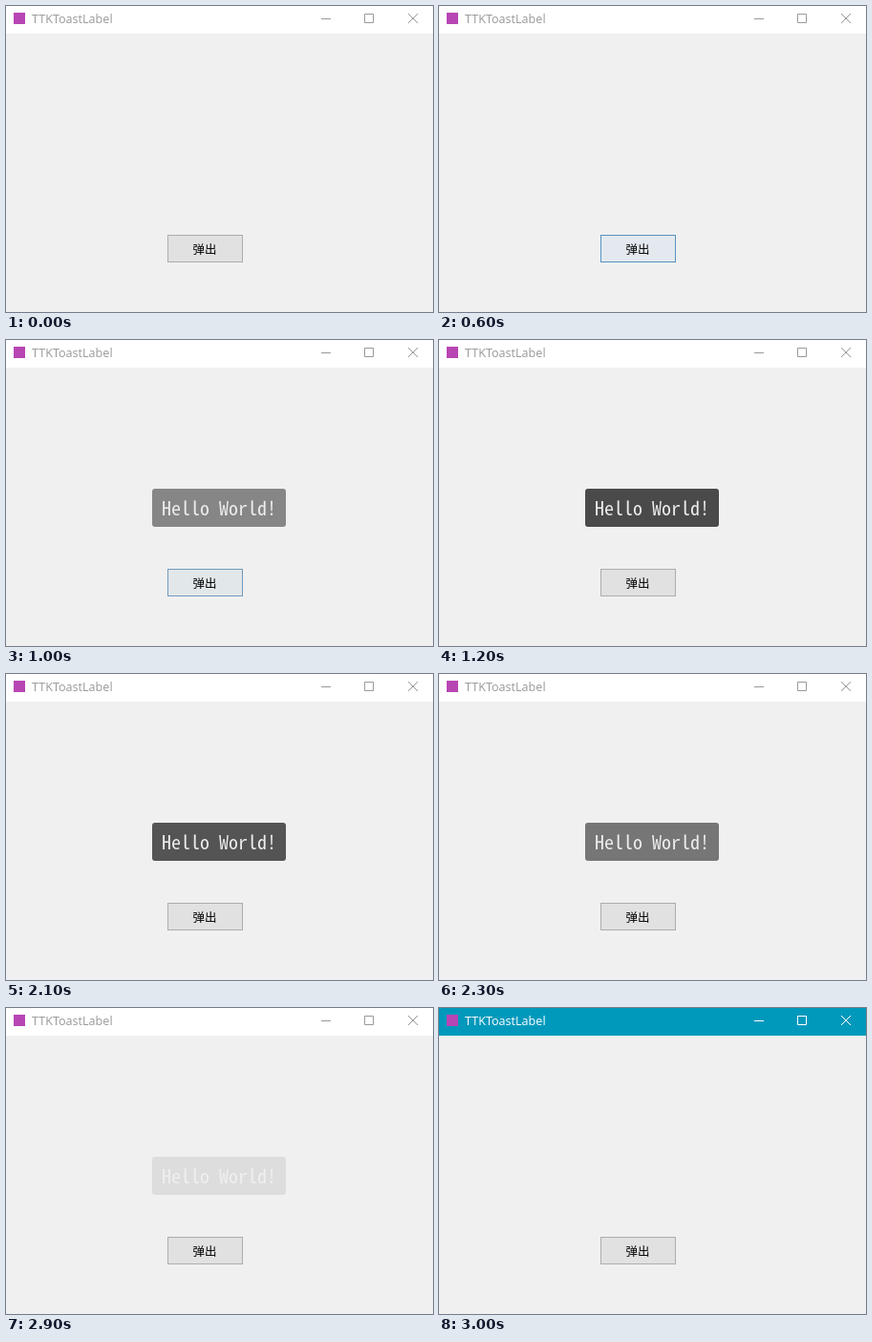
An HTML page for the animation above (3.7 s loop, 447 by 321 pixels).

```html
<!DOCTYPE html>
<html lang="zh">
<head>
<meta charset="utf-8">
<title>TTKToastLabel</title>
<style>
  html, body { margin: 0; height: 100%; overflow: hidden; background: #f0f0f0; }
  svg { display: block; }
  #bar { fill: #fff; color: #999; }
  #bar.active { fill: #0099bc; color: #fff; }
  #bar text { fill: currentColor; font: 12.6px "Open Sans", "Noto Sans", sans-serif; }
  #bar path { fill: none; stroke: currentColor; }
  #label { font: 12.5px "Noto Sans CJK SC", "Noto Sans CJK", sans-serif; text-anchor: middle; }
  #toast text { fill: #ececec; font: 20px "Noto Sans Mono CJK SC", "Noto Sans Mono", monospace; }
</style>
</head>
<body>
<svg width="447" height="321">
  <g id="bar">
    <rect width="447" height="29"/>
    <rect x="8" y="7" width="12" height="12" fill="#b845b4"/>
    <text x="27" y="18">TTKToastLabel</text>
    <path d="M330 13.5h10M375.5 8.5h9v9h-9z"/>
    <path d="M421 8l10 10M431 8l-10 10"/>
  </g>
  <rect id="button" x="169.5" y="240.5" width="78" height="28"/>
  <text id="label" x="208" y="259.5">弹出</text>
  <g id="toast">
    <rect x="153" y="156" width="140" height="40" rx="3" fill="#4a4a4a"/>
    <text x="163" y="184">Hello World!</text>
  </g>
</svg>
<script>
  const LOOP = 3700, STEP = 100;
  const [bar, button, toast] = ['bar', 'button', 'toast'].map(id => document.getElementById(id));
  const clamp = v => Math.max(0, Math.min(1, v));
  const mix = (a, b, k) => `rgb(${a.map((v, i) => Math.round(v + (b[i] - v) * k))})`;

  function hover(t) {
    if (t < 600 || t >= 1100) return 0;
    return t < 700 ? 0.5 : t < 1000 ? 1 : 0.35;
  }

  function draw(now) {
    const t = Math.floor(now % LOOP / STEP) * STEP;
    const k = hover(t);
    button.setAttribute('fill', mix([225, 225, 225], [229, 241, 251], k));
    button.setAttribute('stroke', mix([173, 173, 173], [0, 120, 215], k));
    // quick fade in, slower fade out
    toast.setAttribute('opacity', Math.min(clamp((t - 685) / 500), clamp((3000 - t) / 960)));
    bar.setAttribute('class', t >= 3000 ? 'active' : '');
  }

  const start = performance.now();
  function tick() {
    draw(performance.now() - start);
    requestAnimationFrame(tick);
  }
  tick();
</script>
</body>
</html>
```
